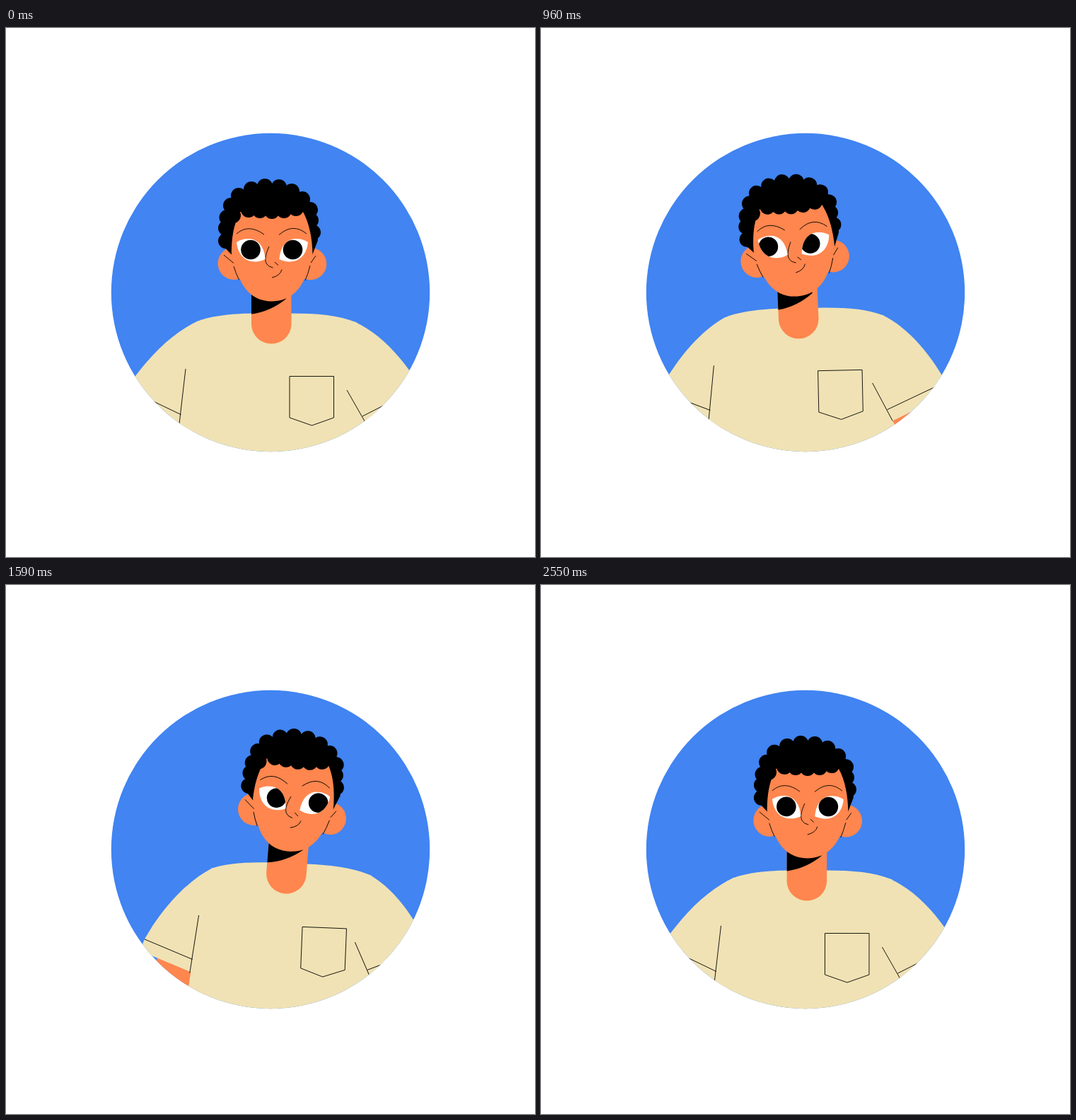
An HTML page for the animation above (2580 ms loop, 748x748 px).

```html
<!DOCTYPE html>
<html lang="en">
<head>
<meta charset="utf-8">
<title>Swaying portrait</title>
<style>
  html, body { margin: 0; width: 100%; height: 100%; overflow: hidden; background: #fff; }
  svg { display: block; width: 100vw; height: 100vh; }
  .skin { fill: #ff864e; }
  .shirt { fill: #f0e2b4; }
  .line { fill: none; stroke: #000; stroke-width: .9; }
</style>
</head>
<body>
<svg viewBox="0 0 748 748">
  <defs>
    <clipPath id="disc"><circle cx="374" cy="374" r="225.200"/></clipPath>
    <clipPath id="clipL"><path id="shapeL"/></clipPath>
    <clipPath id="clipR"><path id="shapeR"/></clipPath>
  </defs>
  <g clip-path="url(#disc)">
    <rect width="748" height="748" fill="#4184f2"/>
    <g id="body">
      <g id="armL">
        <path class="skin" d="M188 537L260 571L240 640L150 610Z"/>
        <path class="shirt" d="M272 414C237 430 207 460 183 492L171 510L163.500 526L262 573L310 480L310 420Z"/>
        <path class="line" d="M171 510L270 557.500"/>
      </g>
      <path class="shirt" d="M347 403.500C315 404 285 408 269 415.500L254 482L238 640H545L496 416.500C470 406 440 403.500 403 403.500Z"/>
      <path class="line" d="M254 482L244.500 564"/>
      <path class="line" d="M401 492.500H463.500V551L432.500 562L401 551Z"/>
      <g id="armR">
        <path class="skin" d="M512 564.500L590 524L620 600L540 614Z"/>
        <path class="shirt" d="M493 415.500C525 430 550 456 571 485L586 507L594 522L512 564.500L482 512L440 430Z"/>
        <path class="line" d="M482 512L512 564.500M504 549L586 507"/>
      </g>
      <g id="neck">
        <path class="skin" d="M347 350V420A28.300 28.300 0 0 0 403.500 420V350Z"/>
        <path d="M347 360V404.500Q374 401 396 383V360Z"/>
      </g>
    </g>
    <g id="head">
      <g class="skin">
        <circle cx="322.500" cy="333" r="23"/>
        <circle cx="430.500" cy="333.500" r="22.800"/>
        <path d="M319 300V312C321 334 328 352 336 365C345 379 359 386.500 376 386.500C394 386.500 408 378 417 364C425 351 431 334 434 312V300Z"/>
      </g>
      <path d="M304 305L318.500 320H433.500L441 300L436 250L404 229L350 226L322 246L308 275Z"/>
      <g id="curls"></g>
      <path class="skin" d="M318.800 318C319 298 321 280 331 260H420C429 276 433 298 433.500 320L430 332H322Z"/>
      <g id="fringe"></g>
      <path class="line" d="M308 321L322 332.500M322 337Q325 347 329.500 356M438 322L431 332M430 336Q427 348 423 357"/>
      <path class="line" d="M326 291Q343 276 365 292M386 292.500Q406 275 425 291"/>
      <path class="line" d="M372 309C367 320 365 329 369 334Q371 337.500 377.500 339M380 331L385 335.500M376 353Q388 350 390 341.500"/>
      <g clip-path="url(#clipL)"><rect x="320" y="290" width="55" height="45" fill="#fff"/><circle id="pupilL" cy="313.500" r="13.800"/></g>
      <g clip-path="url(#clipR)"><rect x="380" y="290" width="55" height="45" fill="#fff"/><circle id="pupilR" cy="313.500" r="13.800"/></g>
      <path id="lids" class="line"/>
    </g>
  </g>
</svg>
<script>
const LOOP = 2580, STEP = 30;
const $ = id => document.getElementById(id);
const set = (id, name, value) => $(id).setAttribute(name, value);
const mix = (a, b, k) => a + (b - a) * k;
const ramp = (a, b, x) => {
  const k = Math.min(1, Math.max(0, (x - a) / (b - a)));
  return k * k * (3 - 2 * k);
};

// Each move: start time, then lean (degrees), lift and gaze at its end.
const moves = [
  { start: 0, lean: -2.8, lift: 10, gaze: -6, dip: 0 },
  { start: 859, lean: 2.33, lift: 10.3, gaze: 6, dip: 3 },
  { start: 1770, lean: 0.06, lift: 0, gaze: 0, dip: 0 }
];
const rest = { lean: 0, lift: 0, gaze: 0 };
const HEAD_LAG = 6;

// Quick start with a long settling tail.
const settle = u => u <= 0 ? 0 : 1 / (1 + (128 / u) ** 3.36);

const dots = (id, r, points) => {
  $(id).innerHTML = points.map(([x, y]) => `<circle cx="${x}" cy="${y}" r="${r}"/>`).join("");
};
dots("curls", 11, [[347, 228], [366, 224], [386, 225], [404, 231], [419, 242], [430, 257], [431, 272], [434, 289],
  [329, 237], [318, 251], [312.5, 268], [311, 283], [311, 301]]);
dots("fringe", 11, [[321, 265], [343, 257], [359, 258], [376, 259], [393, 258], [410, 255]]);

// Both lids meet on a shallow curve as shut goes to 1; side mirrors the eye.
function eye(side, shut) {
  const pt = (x, y) => `${376.5 + side * (376.5 - x)} ${y}`;
  const toward = (x, y, shutX, shutY) => pt(mix(x, shutX, shut), mix(y, shutY, shut));
  const lid = `M${pt(326, 303)}C${toward(340, 294, 338, 317)} ${toward(364, 295, 352, 325)} ${pt(366.5, 327)}`;
  return { lid, shape: `${lid}C${toward(350, 335, 352, 325)} ${toward(329, 330, 338, 317)} ${pt(326, 303)}Z` };
}

function draw(t) {
  const i = moves.findLastIndex(m => t >= m.start);
  const to = moves[i], from = moves[i - 1] || rest;
  const u = t - to.start, p = settle(u);
  const lean = mix(from.lean, to.lean, p);
  const headLean = mix(from.lean, to.lean, settle(u - HEAD_LAG));
  const lift = mix(from.lift, to.lift, p) - to.dip * 4 * p * (1 - p);
  const gaze = mix(from.gaze, to.gaze, ramp(215, 275, u));
  const shut = 0.94 * ramp(150, 225, u) * (1 - ramp(265, 360, u));

  set("body", "transform", `translate(0 ${-lift}) rotate(${lean} 382 940)`);
  set("armL", "transform", `rotate(${-0.5 * lift} 275 428)`);
  set("armR", "transform", `rotate(${0.39 * lift} 491 428)`);
  set("neck", "transform", `rotate(${lean} 375 420)`);
  set("head", "transform", `translate(${12.3 * headLean} ${-0.93 * lift}) rotate(${2.92 * headLean} 377 330)`);

  const left = eye(1, shut), right = eye(-1, shut);
  set("shapeL", "d", right.shape && eye(-1, shut).shape);
  set("shapeR", "d", left.shape);
  set("lids", "d", left.lid + right.lid);
  set("lids", "opacity", 0.4 * ramp(0.5, 0.9, shut));
  set("pupilL", "cx", 346 + gaze);
  set("pupilR", "cx", 405.5 + gaze);
}

function tick() {
  draw(Math.floor(performance.now() % LOOP / STEP) * STEP);
  requestAnimationFrame(tick);
}
tick();
</script>
</body>
</html>
```
